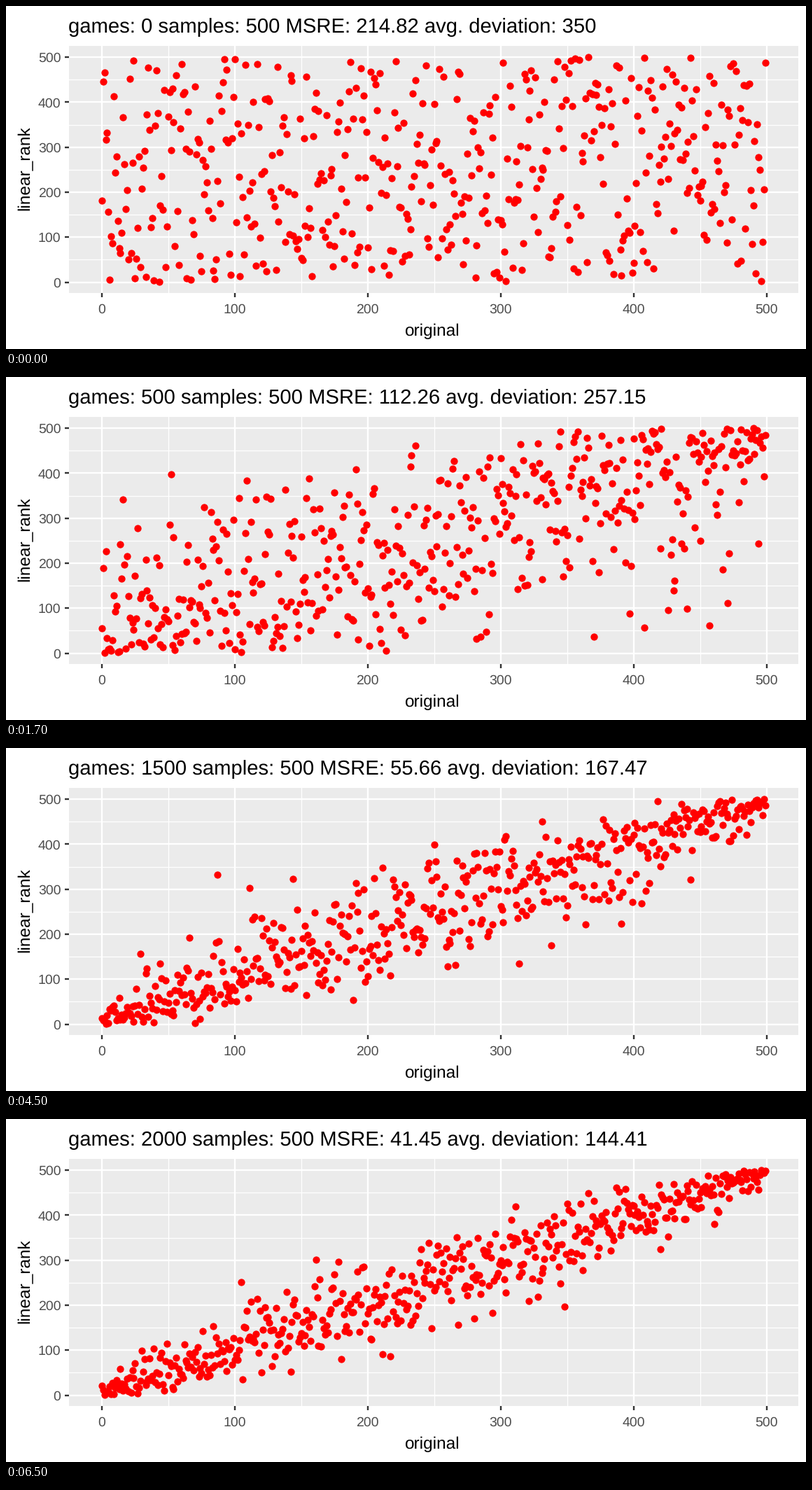
A matplotlib script that plays this animation: 1143 by 490 pixels, repeating every 8000 ms.

```python
import matplotlib.pyplot as plt
import numpy as np
from matplotlib.animation import FuncAnimation

W, H, DPI = 1143, 490, 100
PT = 72 / DPI  # points per pixel
LEFT, RIGHT, TOP, BOTTOM = 89.5, 1132, 57, 410
TITLE, AXIS, TICK = 29.22, 24.35, 19.48  # text sizes in pixels
N = 500

plt.rcParams.update({
    "font.family": "Liberation Sans",
    "text.hinting": "none",
    "toolbar": "None",
})

# RMS rank error, average deviation, two stray (sample, rank) points
STEPS = [
    (214.82, "350", (6, 5), (499, 488)),
    (112.26, "257.15", (52, 398), (457, 62)),
    (72.37, "201.93", (69, 285), (301, 77)),
    (55.66, "167.47", (87, 332), (111, 303)),
    (41.45, "144.41", (161, 301), (311, 419)),
]

samples = np.arange(N)
p = 0.04 + 0.92 * (samples + 0.5) / N
skill = np.log(p / (1 - p))


def make_ranks(seed, rms, strays):
    """Rank by skill plus noise, scaled until the RMS rank error fits."""
    noise = np.random.default_rng(seed).normal(size=N)
    xs, ys = np.transpose(strays)
    free = np.setdiff1d(samples, xs)
    values = np.setdiff1d(samples + 1, ys)
    ranks = np.empty(N)
    ranks[xs] = ys
    lo, hi = 0.0, 60.0
    for _ in range(40):
        scale = (lo + hi) / 2
        order = np.argsort((skill + scale * noise)[free])
        ranks[free[order]] = values
        if np.sqrt(np.mean((ranks - samples) ** 2)) < rms:
            lo = scale
        else:
            hi = scale
    return ranks


def title_for(step):
    rms, dev, *_ = STEPS[step]
    return f"games: {500 * step} samples: {N} MSRE: {rms:.2f} avg. deviation: {dev}"


clouds = [np.column_stack([samples, make_ranks(20 + k, rms, strays)])
          for k, (rms, _, *strays) in enumerate(STEPS)]

fig = plt.figure(figsize=(W / DPI, H / DPI), dpi=DPI, facecolor="white")
ax = fig.add_axes([LEFT / W, 1 - BOTTOM / H, (RIGHT - LEFT) / W, (BOTTOM - TOP) / H],
                  facecolor="#EBEBEB")
ax.set(xlim=(-24.95, 523.95), ylim=(-23.95, 524.95))
ax.spines[:].set_visible(False)
ax.set_axisbelow(True)
for axis in (ax.xaxis, ax.yaxis):
    axis.set_ticks(range(0, 501, 100))
    axis.set_ticks(range(50, 500, 100), minor=True)
ax.tick_params(which="major", length=6.1 * PT, width=2.4 * PT, color="#333333",
               labelbottom=False, labelleft=False)
ax.tick_params(which="minor", length=0)
ax.grid(which="major", color="white", lw=2.4 * PT)
ax.grid(which="minor", color="white", lw=1.2 * PT)


def label(x, y, text, size, color="black", **kw):
    return fig.text(x / W, 1 - y / H, text, fontsize=size * PT, color=color,
                    va="baseline", **kw)


for v in range(0, 501, 100):
    px, py = ax.transData.transform((v, v))
    label(px, 438.5, str(v), TICK, "#4D4D4D", ha="center")
    label(78.5, H - py + 7, str(v), TICK, "#4D4D4D", ha="right")
label((LEFT + RIGHT) / 2 - 1, 471, "original", AXIS, ha="center")
label(33.5, (TOP + BOTTOM) / 2 - 2, "linear_rank", AXIS, ha="center",
      rotation=90, rotation_mode="anchor")
title = label(89, 38, title_for(0), TITLE, ha="left")

dots = ax.scatter(*clouds[0].T, s=(10.3 * PT) ** 2, c="red", linewidths=0, zorder=3)


def update(i):
    step = (i + 3) // 4  # the first step is short, later ones last four ticks
    dots.set_offsets(clouds[step])
    title.set_text(title_for(step))
    return dots, title


anim = FuncAnimation(fig, update, frames=16, interval=500, repeat=True, repeat_delay=0)
plt.show()
```
